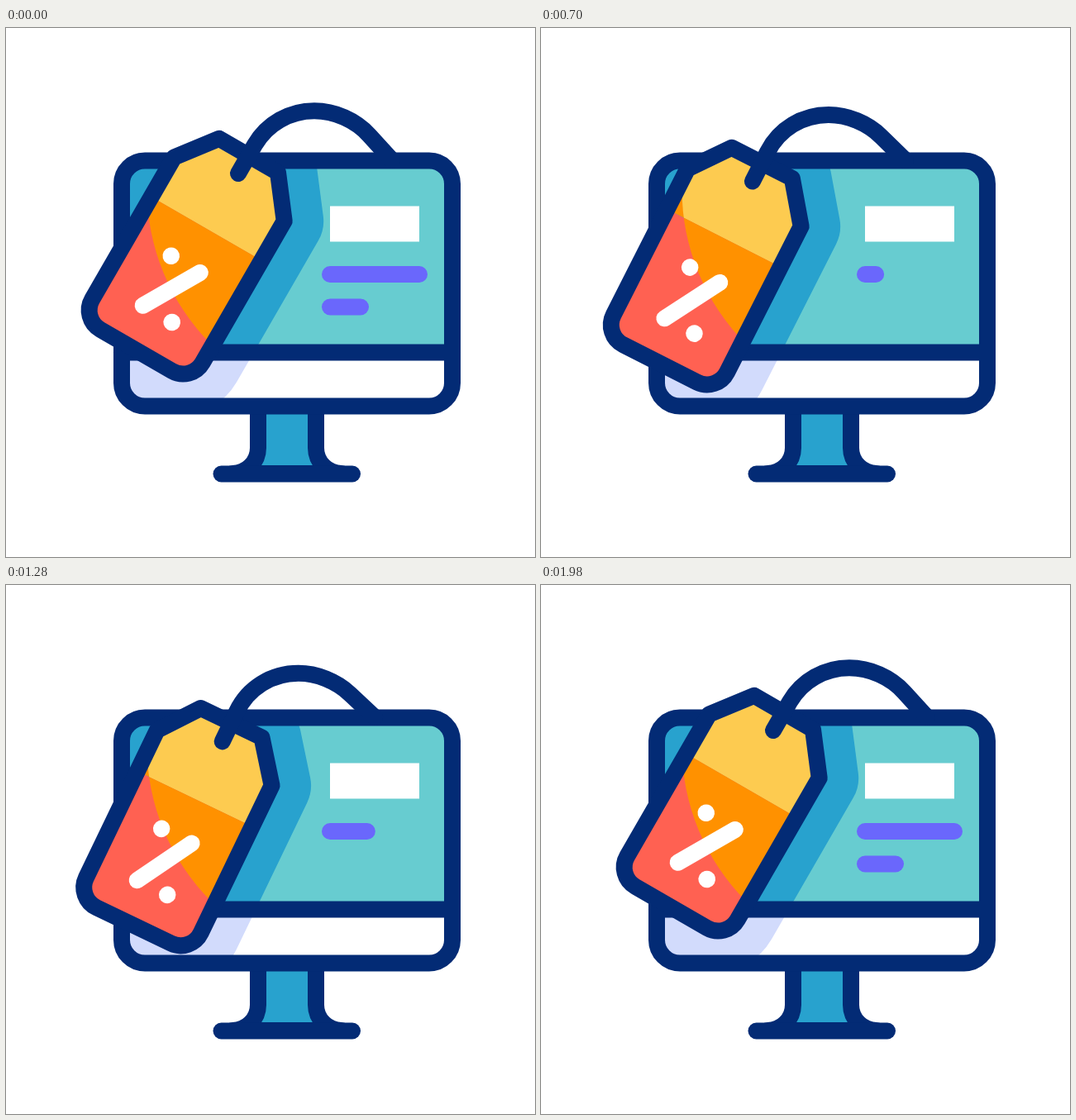
Animation, 640 px wide and 640 px high, one loop 2.4 s. Source, as an HTML page with a canvas:

```html
<!DOCTYPE html>
<html lang="en">
<head>
<meta charset="utf-8">
<title>Online discount</title>
<style>
html, body { margin: 0; width: 100%; height: 100%; overflow: hidden; background: #fff; }
canvas { display: block; width: 640px; height: 640px; }
</style>
</head>
<body>
<canvas id="stage"></canvas>
<script>
const canvas = document.getElementById('stage');
const ctx = canvas.getContext('2d');
const scale = Math.max(1, window.devicePixelRatio || 1);
canvas.width = canvas.height = 640 * scale;

const LOOP = 2400;
const NAVY = '#032b75', TEAL = '#67ccd0', BLUE = '#28a2ce', LILAC = '#d2dbfc';
const YELLOW = '#fdcb50', ORANGE = '#ff9100', CORAL = '#ff6152', PURPLE = '#6a67fc';
const REST = 176;

// time, height of the tag's hole
const SWING = [[0, REST], [452, 235], [894, 152.5], [1260, 189.5], [1640, 169.5], [1980, REST]];
// time, horizontal place of the hole
const DRIFT = [[0, 281], [393, 281], [783, 253], [990, 253], [1762, 281]];
// time, share of the text lines that is written
const TYPING = [[0, 1], [830, 0.034], [1005, 0.034], [1775, 1]];
// inner x, inner y, direction x, direction y, full length
const SPARKS = [[134, 121, -0.99, -0.13, 69], [153, 92, -0.6, -0.8, 94], [187, 80, 0.36, -0.93, 62]];

const clamp = v => Math.min(1, Math.max(0, v));
const easeOut = u => 1 - (1 - u) ** 2;

function track(keys, t) {
  for (let i = 1; i < keys.length; i++) {
    const [t0, a] = keys[i - 1], [t1, b] = keys[i];
    if (t <= t1) return a + (b - a) * (1 - Math.cos(Math.PI * (t - t0) / (t1 - t0))) / 2;
  }
  return keys[keys.length - 1][1];
}

function fill(path, color) {
  ctx.fillStyle = color;
  ctx.fill(path);
}

function stroke(path, color = NAVY, width = 20) {
  ctx.strokeStyle = color;
  ctx.lineWidth = width;
  ctx.stroke(path);
}

function line(x0, y0, x1, y1, color, width) {
  const p = new Path2D();
  p.moveTo(x0, y0);
  p.lineTo(x1, y1);
  stroke(p, color, width);
}

function dot(x, y, r, color) {
  const p = new Path2D();
  p.arc(x, y, r, 0, 7);
  fill(p, color);
}

function box(x, y, w, h, color) {
  ctx.fillStyle = color;
  ctx.fillRect(x, y, w, h);
}

// Tag outline around its hole at 0,0
const tagShape = new Path2D();
tagShape.moveTo(-41, -25);
tagShape.lineTo(41, -25);
tagShape.lineTo(77, 22);
tagShape.arcTo(77, 247, -77, 247, 27);
tagShape.arcTo(-77, 247, -77, 22, 27);
tagShape.lineTo(-77, 22);
tagShape.closePath();

const frame = new Path2D();
frame.roundRect(140, 160.5, 400, 297, 28);

const stand = new Path2D();
stand.moveTo(305, 460);
stand.lineTo(305, 508);
stand.arc(274, 508, 31, 0, Math.PI / 2);
stand.lineTo(406, 539);
stand.arc(406, 508, 31, Math.PI / 2, Math.PI);
stand.lineTo(375, 460);

function place(pose) {
  ctx.translate(pose.x, pose.y);
  ctx.rotate(pose.turn);
}

function drawTextLines(share) {
  const written = share * 145;
  line(392, 298, 392 + Math.min(written, 108), 298, PURPLE);
  if (written > 108) line(392, 337.5, 392 + written - 108, 337.5, PURPLE);
}

function drawScreen(pose, share) {
  ctx.save();
  ctx.clip(frame);
  box(140, 160, 400, 232, TEAL);
  box(140, 392, 400, 66, '#fff');
  for (const [top, height, color] of [[160, 232, BLUE], [392, 66, LILAC]]) {
    ctx.save();
    ctx.beginPath();
    ctx.rect(140, top, 400, height);
    ctx.clip();
    place(pose);
    fill(tagShape, color);
    stroke(tagShape, color, 95);
    ctx.restore();
  }
  ctx.restore();
  box(392, 215.5, 108, 43, '#fff');
  drawTextLines(share);
  line(140, 392.5, 540, 392.5);
  stroke(frame);
}

function drawTag(pose) {
  const halves = (top, bottom) => {
    box(-90, -40, 180, 117, top);
    box(-90, 77, 180, 180, bottom);
  };
  ctx.save();
  place(pose);
  ctx.save();
  ctx.clip(tagShape);
  halves(ORANGE, CORAL);
  // The lit area stays still while the tag swings
  ctx.rotate(-pose.turn);
  ctx.beginPath();
  ctx.arc(436 - pose.x, 195 - pose.y, 265.5, 0, 7);
  ctx.clip();
  ctx.rotate(pose.turn);
  halves(YELLOW, ORANGE);
  ctx.restore();
  line(-20, 196, 20, 127, '#fff');
  dot(-20.5, 127, 10.3, '#fff');
  dot(20.5, 196, 10.3, '#fff');
  stroke(tagShape);
  ctx.restore();
}

// Rounded bend from p to q whose tangents meet at m
function bend(path, p, m, q, k = 0.62) {
  const mix = (a, b) => a + (b - a) * k;
  path.bezierCurveTo(mix(p[0], m[0]), mix(p[1], m[1]), mix(q[0], m[0]), mix(q[1], m[1]), q[0], q[1]);
}

function drawString(pose) {
  const { x, y, turn } = pose;
  const drop = (y - REST) / 59;
  const top = [x + 92, 100.3 + 0.49 * (y - REST)];
  const p = [x + 40 * Math.sin(turn), y - 40 * Math.cos(turn)];
  const slope = (47.7 - 19.7 * drop) * Math.PI / 180;
  const end = [x + 186 - 7 * Math.max(0, drop), 160];
  const q = [end[0] - 41 * Math.cos(slope), end[1] - 41 * Math.sin(slope)];
  const path = new Path2D();
  path.moveTo(x, y);
  path.lineTo(...p);
  bend(path, p, [p[0] + (p[1] - top[1]) * Math.tan(turn), top[1]], top);
  bend(path, top, [q[0] - (q[1] - top[1]) / Math.tan(slope), top[1]], q);
  path.lineTo(...end);
  stroke(path);
}

function drawSparks(t) {
  const head = easeOut(clamp((t - 840) / 240));
  const tail = easeOut(clamp((t - 940) / 240));
  if (head <= tail) return;
  for (const [x, y, dx, dy, len] of SPARKS) {
    const a = tail * len, b = head * len;
    line(x + dx * a, y + dy * a, x + dx * b, y + dy * b, YELLOW);
  }
}

function draw(t) {
  const y = track(SWING, t);
  const pose = { x: track(DRIFT, t), y, turn: (30 - 0.322 * (y - REST)) * Math.PI / 180 };
  ctx.setTransform(scale, 0, 0, scale, 0, 0);
  ctx.lineCap = ctx.lineJoin = 'round';
  box(0, 0, 640, 640, '#fff');
  fill(stand, BLUE);
  stroke(stand);
  line(260.5, 539.5, 419, 539.5);
  drawScreen(pose, track(TYPING, t));
  drawSparks(t);
  drawTag(pose);
  drawString(pose);
}

const start = performance.now();
function tick() {
  draw((performance.now() - start) % LOOP);
  requestAnimationFrame(tick);
}
tick();
</script>
</body>
</html>
```
